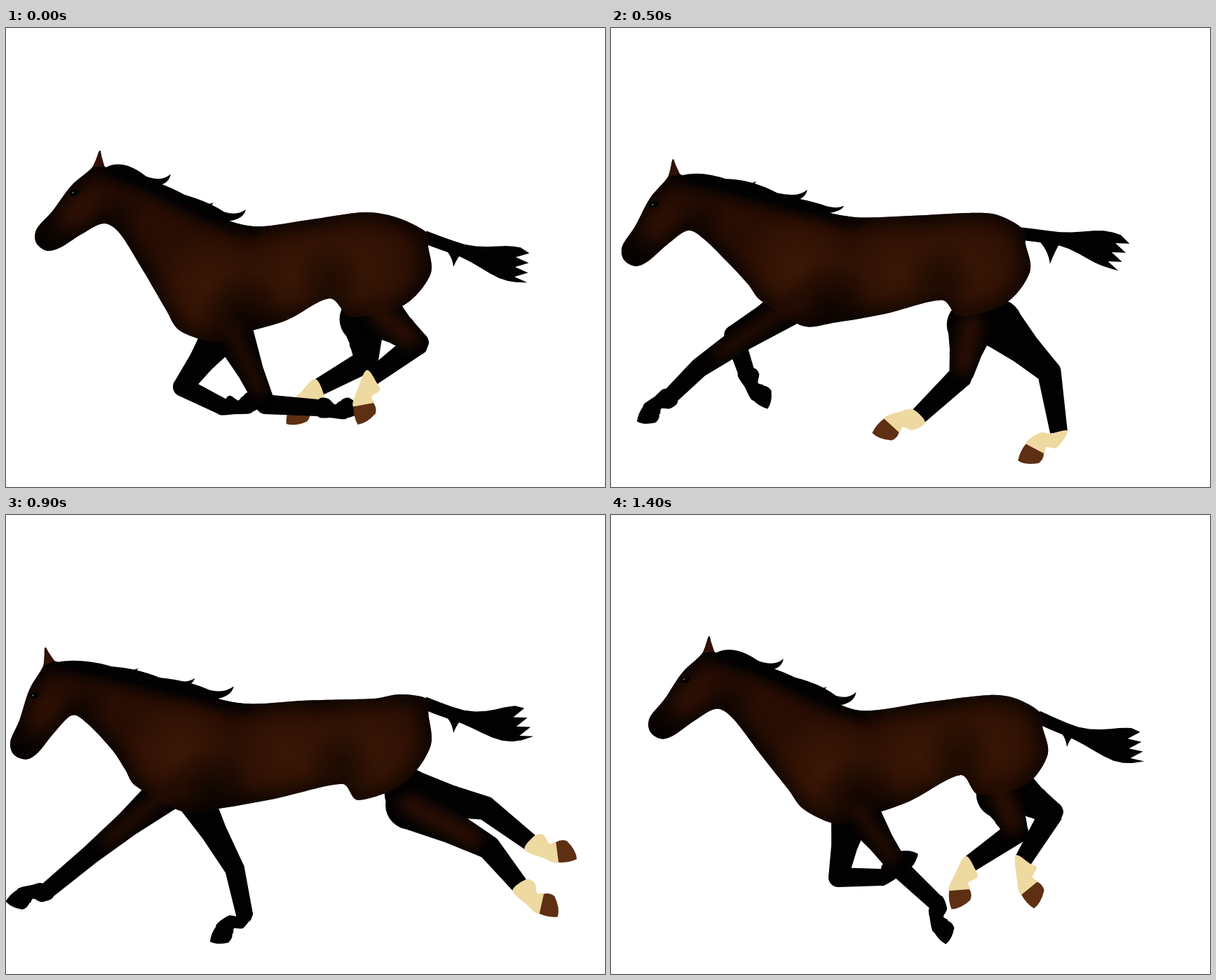
Write an HTML page with a canvas that moves like this. It is 854x655 px and loops after 1.5 s.

```html
<!DOCTYPE html>
<html lang="en">
<head>
<meta charset="utf-8">
<title>Galloping horse</title>
<style>
html, body { margin: 0; width: 100%; height: 100%; overflow: hidden; background: #fff; }
canvas { display: block; }
</style>
</head>
<body>
<canvas id="stage" width="854" height="655"></canvas>
<script>
const ctx = document.getElementById('stage').getContext('2d');
const LOOP = 1500, STEP = 100, RAD = Math.PI / 180;
const INK = '#020202', SOCK = '#eed9a1', HOOF = '#5e2f13';

const mix = (a, b, k = .5) => [a[0] + (b[0] - a[0]) * k, a[1] + (b[1] - a[1]) * k];
const add = (a, x, y) => [a[0] + x, a[1] + y];
const dist = (a, b) => Math.hypot(b[0] - a[0], b[1] - a[1]);
const ramp = (a, b, x) => {
  const u = Math.min(1, Math.max(0, (x - a) / (b - a)));
  return u * u * (3 - 2 * u);
};

// Stride: a few key moments, joined by a periodic cubic.
const KEYS = [0, 200, 400, 600, 900, 1200, 1400];

function sample(values, time) {
  const n = KEYS.length, i = KEYS.findLastIndex(k => k <= time);
  const timeOf = k => KEYS[(k + n) % n] + LOOP * Math.floor(k / n);
  const [t0, t1, t2, t3] = [-1, 0, 1, 2].map(k => timeOf(i + k));
  const [a, b, c, d] = [-1, 0, 1, 2].map(k => values[(i + k + n) % n]);
  const span = t2 - t1, u = (time - t1) / span;
  return b + (c - b) * ramp(0, 1, u)
    + (c - a) / (t2 - t0) * span * u * (1 - u) ** 2
    - (d - b) / (t3 - t1) * span * u * u * (1 - u);
}
const track = (xs, ys) => time => [sample(xs, time), sample(ys, time)];

const ear = track([134, 138, 104, 76, 56, 98, 140], [175, 183, 186, 188, 189, 183, 173]);
const breast = track([248, 240, 215, 210, 183, 250, 275], [432, 414, 397, 381, 385, 421, 420]);
const flank = track([461, 461, 453, 490, 480, 495, 498], [386, 393, 390, 387, 384, 360, 371]);
const dock = track([600, 600, 580, 598, 600, 615, 612], [292, 298, 291, 283, 262, 270, 282]);

// Legs: knee or hock, fetlock, and the turn of the foot in degrees forward from straight down.
const nearFront = {
  knee: track([370, 301, 196, 164, 120, 309, 412], [537, 520, 465, 425, 485, 515, 505]),
  fetlock: track([445, 368, 225, 168, 60, 314, 462], [542, 510, 500, 485, 535, 580, 552]),
  turn: [-87, -149, -71, 5, 74, 53, -15]
};
const farFront = {
  knee: track([252, 190, 127, 150, 326, 378, 324], [512, 460, 468, 500, 505, 512, 517]),
  fetlock: track([308, 203, 97, 112, 340, 443, 385], [540, 525, 508, 543, 570, 508, 517]),
  turn: [-96, -30, 35, 59, 51, -96, -123]
};
const nearHind = {
  knee: track([586, 510, 452, 563, 688, 665, 628], [450, 468, 480, 507, 474, 398, 425]),
  fetlock: track([522, 424, 372, 529, 732, 705, 588], [498, 483, 524, 572, 528, 467, 492]),
  turn: [16, 30, 59, 64, -51, -54, -13]
};
const farHind = {
  knee: track([514, 480, 562, 675, 683, 638, 578], [475, 487, 500, 475, 418, 425, 452]),
  fetlock: track([447, 401, 538, 720, 747, 616, 513], [512, 557, 586, 556, 467, 485, 497]),
  turn: [41, 32, 61, 34, -71, -13, 22]
};

// Resting outline: ear tip, face, throat, breast, belly, rump, back, crest, poll.
const REST = [
  [134, 175], [123, 198], [92, 224], [64, 260], [41, 285], [40, 304], [55, 316], [74, 312], [104, 294], [137, 279],
  [160, 293], [197, 350], [228, 402], [248, 432], [300, 448], [343, 434], [400, 417], [461, 386], [492, 412], [566, 396],
  [605, 352], [602, 312], [600, 292], [556, 270], [510, 263], [430, 274], [352, 283], [290, 264], [205, 222], [140, 198]
];
const THROAT = 9, BREAST = 13, GIRTH = 15, FLANK = 17, DOCK = 22, CROUP = 24, WITHERS = 26, POLL = 29;

// The head turns as one piece; the trunk is pulled along by a handful of handles.
function bodyAt(time, swing) {
  const tip = ear(time), nod = 10 * RAD * (1 - swing(30));
  const head = ([x, y]) => {
    const dx = x - REST[0][0], dy = y - REST[0][1], c = Math.cos(nod), s = Math.sin(nod);
    return add(tip, dx * c + dy * s, dy * c - dx * s);
  };
  const shift = (i, p) => [p[0] - REST[i][0], p[1] - REST[i][1]];
  const b = shift(BREAST, breast(time)), f = shift(FLANK, flank(time));
  const handles = [
    [POLL, shift(POLL, head(REST[POLL]))], [THROAT, shift(THROAT, head(REST[THROAT]))],
    [BREAST, b], [GIRTH, [b[0] * .7, b[1] * .3]], [WITHERS, [b[0] * .2, b[1] * .3]],
    [FLANK, f], [CROUP, [f[0] * .8, f[1] * .4]], [DOCK, shift(DOCK, dock(time))]
  ];
  const outline = REST.map((p, i) => {
    if (i <= THROAT || i === POLL) return head(p);
    let x = 0, y = 0, total = 0;
    for (const [h, move] of handles) {
      const w = 1 / (dist(p, REST[h]) ** 2 + 60);
      x += move[0] * w;
      y += move[1] * w;
      total += w;
    }
    return add(p, x / total, y / total);
  });
  return { outline, eye: head([96, 234]) };
}

function smooth(p) {
  const path = new Path2D(), n = p.length;
  const handle = (i, j) => {
    const a = p[(i + n - 1) % n], b = p[(i + 1) % n], len = dist(a, b) || 1;
    const k = Math.min(dist(p[i], p[j]) / 3, len / 6) / len * (j === (i + 1) % n ? 1 : -1);
    return add(p[i], (b[0] - a[0]) * k, (b[1] - a[1]) * k);
  };
  path.moveTo(...p[0]);
  for (let i = 0; i < n; i++) {
    const j = (i + 1) % n;
    path.bezierCurveTo(...handle(i, j), ...handle(j, i), ...p[j]);
  }
  path.closePath();
  return path;
}

function polygon(...p) {
  const path = new Path2D();
  p.forEach(q => path.lineTo(...q));
  path.closePath();
  return path;
}

function buildLeg(leg, time, anchor, hind) {
  const knee = leg.knee(time), fetlock = leg.fetlock(time), turn = sample(leg.turn, time) * RAD;
  const root = mix(anchor, knee, hind ? .3 : .12);
  const joints = [root, mix(root, knee, .55), knee, fetlock];
  const radii = hind ? [35, 23, 17, 12.5] : [29, 18.5, 14, 12];
  const limb = new Path2D();
  let front, back;
  joints.forEach((b, i) => {
    if (i < 3 || !hind) {
      limb.moveTo(b[0] + radii[i], b[1]);
      limb.arc(...b, radii[i], 0, 7, true);
    }
    if (!i) return;
    const a = joints[i - 1], len = dist(a, b) || 1;
    const nx = (a[1] - b[1]) / len, ny = (b[0] - a[0]) / len;
    const side = (p, r) => add(p, nx * r, ny * r);
    front = side(b, radii[i]);
    back = side(b, -radii[i]);
    limb.addPath(polygon(side(a, radii[i - 1]), front, back, side(a, -radii[i - 1])));
  });

  // Foot coordinates: u towards the toe, v towards the front.
  const size = hind ? 1 : .88, c = Math.cos(turn) * size, s = Math.sin(turn) * size;
  const foot = (u, v) => add(fetlock, -s * u - c * v, c * u - s * v);
  const cf = foot(48, 14), cb = foot(35, -12), toe = foot(71, 1), heel = foot(49, -19);
  const pastern = smooth([front, foot(22, 15), cf, cb, foot(27, -7), foot(15, -16), back]);
  const hoof = new Path2D();
  hoof.moveTo(...cf);
  hoof.quadraticCurveTo(...foot(62, 10), ...toe);
  hoof.quadraticCurveTo(...foot(66, -11), ...heel);
  hoof.quadraticCurveTo(...foot(40, -19), ...cb);
  hoof.closePath();
  return { joints, limb, pastern, hoof, hind };
}

function fill(path, color) {
  ctx.fillStyle = color;
  ctx.fill(path);
}

function drawLeg({ limb, pastern, hoof, hind }) {
  fill(limb, INK);
  fill(pastern, hind ? SOCK : INK);
  fill(hoof, hind ? HOOF : INK);
}

function glow([x, y], r, rgb, alpha) {
  const g = ctx.createRadialGradient(x, y, 0, x, y, r);
  g.addColorStop(0, `rgba(${rgb},${alpha})`);
  g.addColorStop(.5, `rgba(${rgb},${alpha * .55})`);
  g.addColorStop(1, `rgba(${rgb},0)`);
  ctx.fillStyle = g;
  ctx.fillRect(x - r, y - r, 2 * r, 2 * r);
}

function softLine(path, width, color, blur) {
  ctx.filter = `blur(${blur}px)`;
  ctx.strokeStyle = color;
  ctx.lineWidth = width;
  ctx.lineCap = ctx.lineJoin = 'round';
  ctx.stroke(path);
  ctx.filter = 'none';
}

function openLine(p) {
  const path = new Path2D();
  p.forEach(q => path.lineTo(...q));
  return path;
}

function drawBody(b, legs) {
  const shape = smooth(b), brown = '74,30,5', dark = '3,1,0';
  fill(shape, '#290e04');
  ctx.save();
  ctx.clip(shape);
  softLine(shape, 22, '#050201', 12);
  softLine(openLine(b.slice(WITHERS)), 22, INK, 9);
  glow(mix(b[CROUP], b[18], .55), 95, brown, .5);
  glow(mix(b[16], b[25], .45), 85, brown, .5);
  glow(mix(b[BREAST], b[WITHERS], .4), 85, brown, .55);
  glow(mix(b[2], b[8]), 38, brown, .2);
  glow(add(b[GIRTH], -8, -25), 65, dark, .65);
  glow(add(b[FLANK], 0, -30), 55, dark, .45);
  glow(mix(b[5], b[6]), 55, dark, .95);
  glow(mix(b[THROAT], b[28], .3), 40, dark, .4);
  ctx.restore();

  // Brown of the upper legs fades into the black lower legs.
  for (const { joints, limb, hind } of legs) {
    const area = new Path2D(shape);
    area.addPath(limb);
    ctx.save();
    ctx.clip(area);
    softLine(openLine([joints[0], joints[1], mix(joints[1], joints[2])]), hind ? 30 : 22, hind ? '#290e04' : '#230c04', 9);
    ctx.restore();
  }
  fill(polygon(b[0], b[1], b[POLL]), '#321206');
}

// Locks rise from the crest and flutter out of step with each other.
function drawMane(b, swing) {
  const crest = k => {
    const s = Math.min(2.99, k * 3), i = Math.floor(s);
    return mix(b[POLL - i], b[POLL - i - 1], s - i);
  };
  for (let i = 0; i < 3; i++) {
    const end = .4 + .24 * i, lift = 16 + 6 * swing(i * 140);
    const root = add(crest(Math.max(0, end - .5)), 0, 2), tip = add(crest(end), 12, -lift);
    const lock = new Path2D();
    lock.moveTo(...root);
    lock.quadraticCurveTo(...add(crest(end - .27), 0, -lift), ...add(crest(end - .1), 0, -8));
    lock.quadraticCurveTo(...add(tip, -12, lift * .55), ...tip);
    lock.quadraticCurveTo(...add(tip, -3, lift * .9), ...add(crest(end - .1), 0, 6));
    lock.quadraticCurveTo(...add(crest(end - .27), 0, 12), ...root);
    fill(lock, INK);
  }
}

function drawTail(base, swing) {
  const bend = add(base, 88, 26 + 14 * swing(290)), tip = add(base, 144, 33 + 8 * swing(0));
  const pull = add(bend, (bend[0] - (base[0] + tip[0]) / 2) * .7, (bend[1] - (base[1] + tip[1]) / 2) * .7);
  const at = (s, v, reach = 0) => {
    const a = mix(base, pull, s), c = mix(pull, tip, s), p = mix(a, c, s), len = dist(a, c);
    const dx = (c[0] - a[0]) / len, dy = (c[1] - a[1]) / len;
    return add(p, dx * reach - dy * v, dy * reach + dx * v);
  };
  const width = s => 9 + 16 * ramp(.25, .8, s);
  const top = [], under = [], fringe = [];
  for (let s = 0; s < .95; s += .1) {
    top.push(at(s, -width(s)));
    under.unshift(at(s, width(s)));
  }
  for (let k = 0; k < 7; k++) fringe.push(at(1, -18 + k * 7, k % 2 ? -14 : 5));
  fill(polygon(...top, ...fringe, ...under), INK);

  const wisp = new Path2D(), end = add(base, 42, 43);
  wisp.moveTo(...at(.12, 4));
  wisp.quadraticCurveTo(...add(end, -3, -22), ...end);
  wisp.quadraticCurveTo(...add(end, 8, -20), ...at(.32, 4));
  fill(wisp, INK);
}

function drawEye([x, y]) {
  ctx.fillStyle = INK;
  ctx.beginPath();
  ctx.ellipse(x, y, 7, 4.5, -.2, 0, 7);
  ctx.fill();
  ctx.fillStyle = '#77777a';
  ctx.fillRect(x - 3, y - 1, 2, 2);
}

function drawHorse(time) {
  const swing = lag => Math.cos((time / LOOP * 360 - lag) * RAD);
  const { outline, eye } = bodyAt(time, swing);
  const shoulder = add(breast(time), 70, -10), hip = add(flank(time), 48, 4);
  const front = [farFront, nearFront].map(leg => buildLeg(leg, time, shoulder, false));
  const hind = [farHind, nearHind].map(leg => buildLeg(leg, time, hip, true));
  // The leading leg of a pair passes in front while it reaches forward.
  if (time >= 300 && time <= 500) front.reverse();
  if (time >= 1300) hind.reverse();

  ctx.fillStyle = '#fff';
  ctx.fillRect(0, 0, 854, 655);
  drawTail(add(dock(time), -4, 6), swing);
  [hind[0], front[0], front[1], hind[1]].forEach(drawLeg);
  drawBody(outline, [front[1], hind[1]]);
  drawMane(outline, swing);
  drawEye(eye);
}

let shown = -1;
function tick(now) {
  const time = Math.floor(now % LOOP / STEP) * STEP;
  if (time !== shown) drawHorse(shown = time);
  requestAnimationFrame(tick);
}
tick(performance.now());
</script>
</body>
</html>
```
